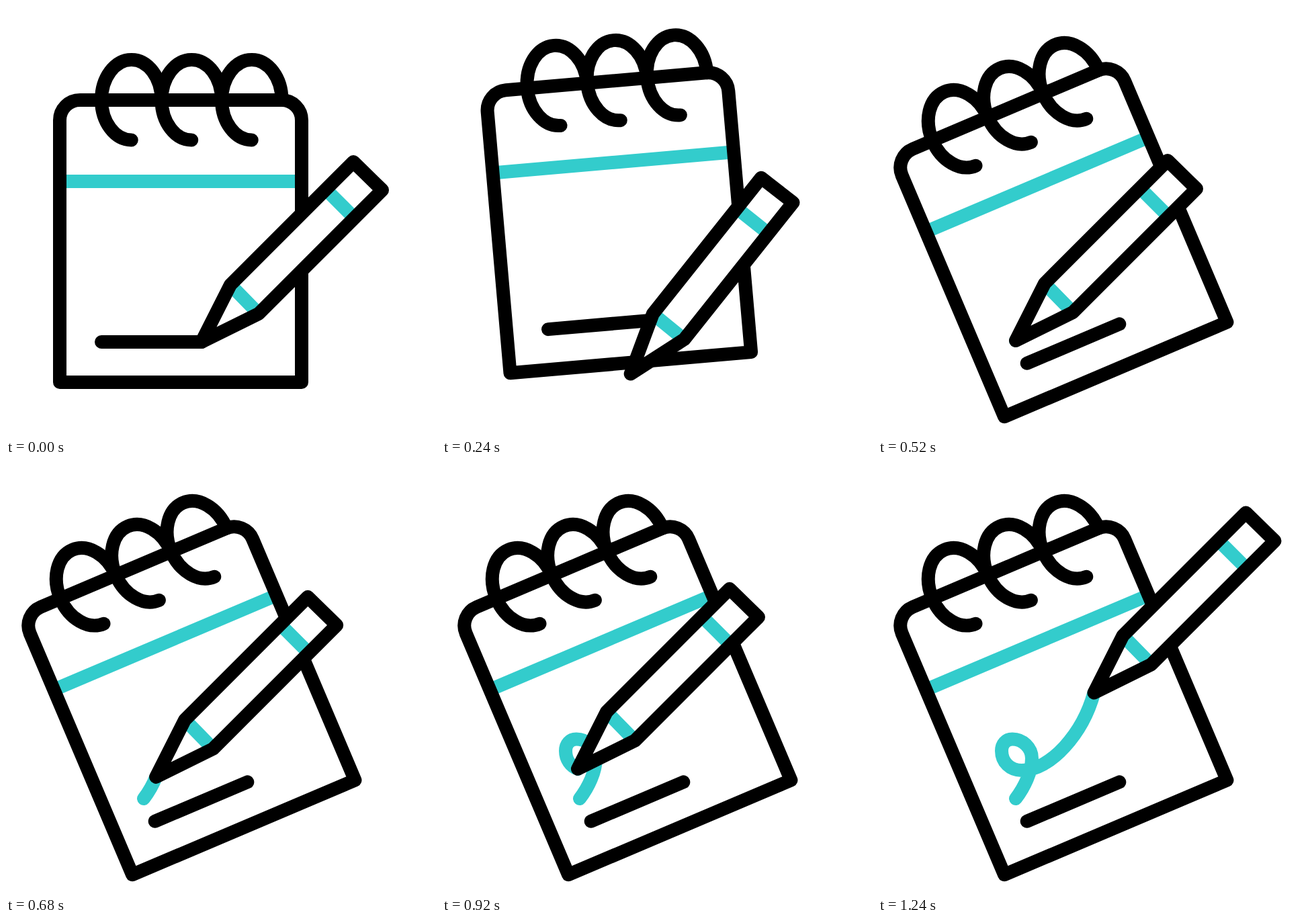
An HTML page that plays this animation: 640x640 px, repeating every 1.48 s.

```html
<!DOCTYPE html>
<html lang="en">
<head>
<meta charset="utf-8">
<title>Notepad and pencil</title>
<style>
  html, body { margin: 0; width: 100%; height: 100%; overflow: hidden; background: #fff; }
  svg { display: block; width: 100%; height: 100%; }
  .ink, .accent { fill: none; stroke-width: 20; stroke-linejoin: round; }
  .ink { stroke: #000; stroke-linecap: round; }
  .accent { stroke: #3cc; }
</style>
</head>
<body>
<svg viewBox="0 0 640 640">
  <defs>
    <path id="ring" d="M186.75 199.5A44.75 60 0 0 1 142 140A44.75 60 0 0 1 231.5 140"/>
  </defs>
  <g id="pad">
    <path class="accent" d="M80 261H440"/>
    <path class="ink" d="M80 560V170A30 30 0 0 1 110 140H410A30 30 0 0 1 440 170V560Z"/>
    <g class="ink">
      <use href="#ring"/>
      <use href="#ring" x="89.5"/>
      <use href="#ring" x="179"/>
    </g>
    <path class="ink" d="M142 500H291.5"/>
  </g>
  <path id="scribble" class="accent" stroke-linecap="round"
    d="M205 498C218 481 229 458 229 438C229 422 215 409.5 200 409.5C190 409.5 184 417 184 427C184 444 197 456 214 456C257 456 305 401 321.5 340.5"/>
  <!-- The pencil's origin is its tip. -->
  <g id="pencil">
    <path fill="#fff" d="M0 0L43 -85L226 -268L269 -226L85 -42Z"/>
    <path class="accent" d="M43 -85L85 -42M185 -227L228 -184"/>
    <path class="ink" d="M0 0L43 -85L226 -268L269 -226L85 -42Z"/>
  </g>
</svg>
<script>
  const LOOP = 1480, STEP = 40, DELAY = 120;
  const HOP_STEPS = 10, LAST_STEP = 28;
  const [pad, scribble, pencil] = ['pad', 'scribble', 'pencil'].map(id => document.getElementById(id));
  const scribbleLength = scribble.getTotalLength();

  const clamp = (v, lo, hi) => Math.min(hi, Math.max(lo, v));
  const ease = p => p * p * (3 - 2 * p);
  const writeEase = p => p * p * (2.56 - 2 * p + 0.44 * p * p);

  function placePencil(x, y, angle) {
    pencil.setAttribute('transform', `translate(${x} ${y}) rotate(${angle})`);
  }

  function draw(time) {
    const step = clamp(Math.floor((time % LOOP - DELAY) / STEP), 0, LAST_STEP);
    const hop = clamp(step / HOP_STEPS, 0, 1);
    const turn = ease(hop);
    const lift = ease(1 - Math.abs(2 * hop - 1));

    pad.setAttribute('transform', `translate(0 ${-43.8 * lift}) rotate(${-23 * turn} 260 320)`);

    const writing = step >= HOP_STEPS;
    scribble.style.display = writing ? '' : 'none';
    if (writing) {
      const drawn = scribbleLength * writeEase((step - HOP_STEPS) / (LAST_STEP - HOP_STEPS));
      scribble.setAttribute('stroke-dasharray', `${drawn} ${scribbleLength + 40}`);
      const tip = scribble.getPointAtLength(drawn);
      placePencil(tip.x, tip.y, 0);
    } else {
      // The tip swings along a U-shaped curve to where the writing starts.
      const dip = 3 * turn * (1 - turn) * 94;
      placePencil(291 - 86 * ease(turn), 500 - 2 * ease(turn) + dip, -10 * lift);
    }
  }

  function tick(now) {
    draw(now);
    requestAnimationFrame(tick);
  }
  draw(0);
  requestAnimationFrame(tick);
</script>
</body>
</html>
```
